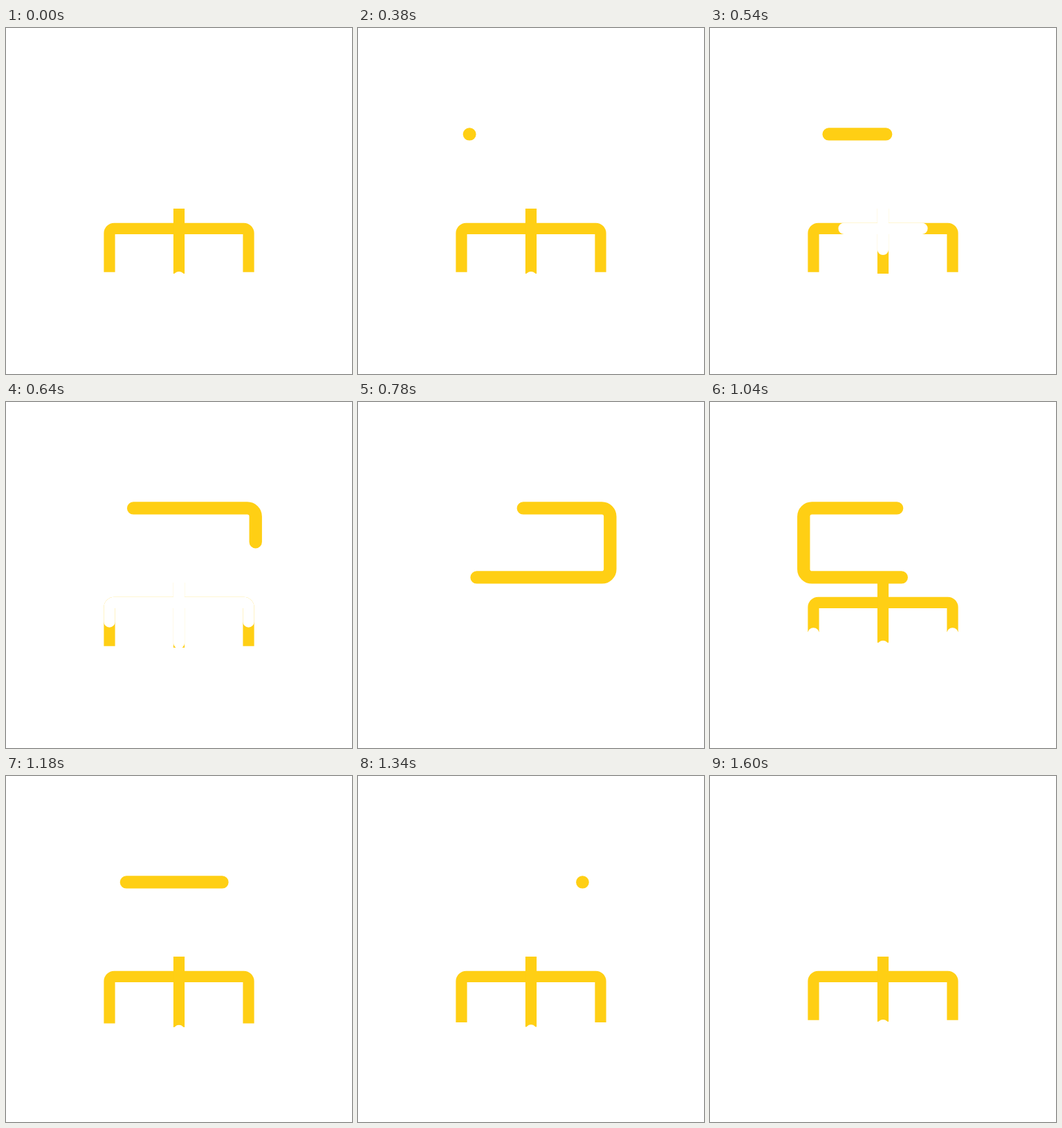
An HTML page for the animation above (1.9 s loop, 500x500 px).

```html
<!DOCTYPE html>
<html lang="en">
<head>
<meta charset="utf-8">
<title>Line icon loop</title>
<style>
  html, body { margin: 0; width: 100%; height: 100%; overflow: hidden; background: #fff; }
  svg { display: block; width: 100%; height: 100%; }
  path { fill: none; stroke: #ffcf14; stroke-width: 16.2; }
  .wipe { stroke: #fff; stroke-linecap: round; }
  #ring { stroke-width: 18.4; stroke-linecap: round; }
</style>
</head>
<body>
<svg viewBox="0 0 500 500">
  <path class="left"/><path class="right"/><path class="stem"/>
  <path class="left wipe"/><path class="right wipe"/><path class="stem wipe"/>
  <path id="ring"/>
</svg>
<script>
const LOOP = 1900, STEP = 20;
const RING_IN = 140, RING_OUT = 1600;
const WIPE = 390, REVEAL = 765;

const ring = document.getElementById("ring");
const limbs = {
  left: "M250 289.8H156.5A7 7 0 0 0 149.5 296.8V394",
  right: "M250 289.8H343.5A7 7 0 0 1 350.5 296.8V394",
  stem: "M250 261V381"
};
for (const name in limbs) {
  const [ink, wipe] = document.querySelectorAll("." + name);
  ink.setAttribute("d", limbs[name]);
  wipe.setAttribute("d", limbs[name]);
  limbs[name] = { ink, wipe };
}

// Progress from 0 to 1 between two times, with the handles x1 and x2 of an ease curve.
function ease(t, from, to, x1 = 1 / 3, x2 = 2 / 3) {
  const x = Math.min(1, Math.max(0, (t - from) / (to - from)));
  let lo = 0, hi = 1;
  for (let i = 0; i < 24; i++) {
    const p = (lo + hi) / 2, q = 1 - p;
    if (3 * p * q * q * x1 + 3 * p * p * q * x2 + p * p * p < x) lo = p; else hi = p;
  }
  return lo * lo * (3 - 2 * lo);
}

const legReach = (t, from) => 201.7 * ease(t, from, from + 430);
const stemReach = (t, from) => 110 * ease(t, from, from + 530, 0.17, 0.2);

function trim(node, from, to) {
  node.style.display = to > from ? "" : "none";
  node.setAttribute("stroke-dasharray", `${Math.max(to - from, 0.3)} 5000`);
  node.setAttribute("stroke-dashoffset", -from);
}

// Yellow runs up to end; white either covers it from the start or notches its tip.
function drawLimb({ ink, wipe }, end, cap, wiped) {
  trim(ink, 0, end);
  if (wiped > 0) trim(wipe, 0, wiped);
  else trim(wipe, cap, cap + 0.3);
}

function drawBracket(t) {
  const late = t < REVEAL ? t + LOOP : t;
  const settle = ease(late, 1180, 1600);

  const leg = legReach(late, REVEAL);
  const legEnd = Math.min(165 - 4.6 * settle, leg - 2);
  const legWipe = t < REVEAL ? legReach(t, WIPE) : 0;
  drawLimb(limbs.left, legEnd, leg, legWipe);
  drawLimb(limbs.right, legEnd, leg, legWipe);

  const stem = stemReach(late, REVEAL) - 11 * settle;
  const stemWipe = t < REVEAL ? stemReach(t, WIPE) : 0;
  drawLimb(limbs.stem, stem - 5, stem, stemWipe);
}

// Two laps of a rounded box, so the line can run past its starting point.
function ringShape(right) {
  const left = 135.3, top = 153.4, bottom = 253.4, r = 12;
  const arc = (x, y) => `A${r} ${r} 0 0 1 ${x} ${y}`;
  const lap = `H${right - r}${arc(right, top + r)}V${bottom - r}${arc(right - r, bottom)}`
    + `H${left + r}${arc(left, bottom - r)}V${top + r}${arc(left + r, top)}`;
  const size = 2 * (right - left + bottom - top) - 8 * r + 2 * Math.PI * r;
  return { path: `M${left + r} ${top}${lap}${lap}`, size };
}

function drawRing(t) {
  if (t < RING_IN || t >= RING_OUT) return trim(ring, 0, 0);
  const { path, size } = ringShape(360.7 + 3.8 * ease(t, 640, 800));
  const drift = 9 + 173 * ease(t, RING_IN, RING_OUT, 0.65, 0.35);
  const head = ease(t, 370, 1197, 0.373, 0.357);
  const tail = ease(t, 640, 1295, 0.66, 0.81);
  ring.setAttribute("d", path);
  trim(ring, drift + size * tail, drift + size * head + 0.3);
}

const start = performance.now();
function tick() {
  const now = (performance.now() - start) % LOOP;
  const t = Math.floor(now / STEP) * STEP;
  drawBracket(t);
  drawRing(t);
  requestAnimationFrame(tick);
}
tick();
</script>
</body>
</html>
```
